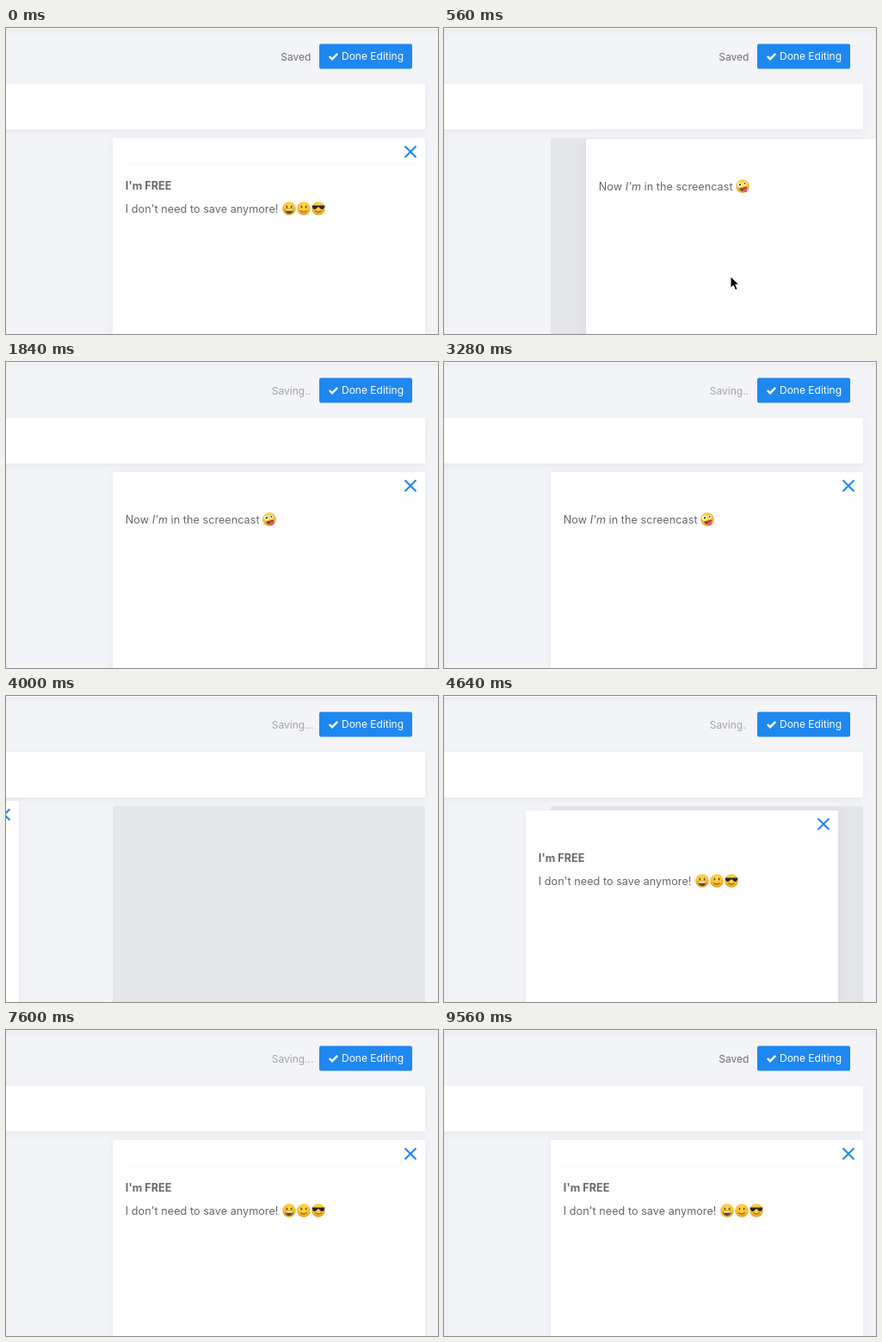
Write an HTML page that moves like this. It is 502 px wide and 356 px high and loops after 9680 ms.

```html
<!DOCTYPE html>
<html lang="en">
<head>
<meta charset="utf-8">
<title>Card swap</title>
<style>
  html, body { margin: 0; width: 100%; height: 100%; overflow: hidden; background: #f3f4f8; }
  svg { display: block; }
  text { font: 12.6px Inter, "Open Sans", sans-serif; letter-spacing: .05px; fill: #666; white-space: pre; }
  .bold { font-weight: 700; }
  .small { font-size: 12px; letter-spacing: 0; }
  .box { fill: #fff; filter: drop-shadow(0 2px 4px rgba(0, 0, 0, .06)); }
</style>
</head>
<body>
<svg width="502" height="356" viewBox="0 0 502 356">
  <defs>
    <radialGradient id="skin" cy=".35" r=".7">
      <stop offset="0" stop-color="#ffe04e"/>
      <stop offset=".6" stop-color="#f9bf33"/>
      <stop offset="1" stop-color="#d98a1c"/>
    </radialGradient>
    <circle id="head" r="7.8" fill="url(#skin)"/>
    <path id="smile" d="M-3.6 2.7Q0 5.7 3.6 2.7" fill="none" stroke="#7a4a12" stroke-linecap="round"/>
    <g id="eyes" fill="#6b4010">
      <ellipse cx="-2.6" cy="-2" rx=".9" ry="1.5"/>
      <ellipse cx="2.6" cy="-2" rx=".9" ry="1.5"/>
    </g>
    <g id="frame">
      <rect class="box" x="124" y="128" width="363" height="250" rx="2"/>
      <path d="M133 158.5H479" stroke="#fafafb"/>
      <path d="M463.5 137.5l13 13m0-13l-13 13" stroke="#1e87f0" stroke-width="2"/>
    </g>
  </defs>

  <rect class="box" x="-10" y="-9" width="522" height="10"/>
  <rect class="box" x="-10" y="65" width="497" height="53" rx="2"/>
  <rect x="364" y="18.5" width="108" height="29" rx="2" fill="#1e87f0"/>
  <path d="M375.8 33l3.2 3.2 6.2-6.4" fill="none" stroke="#fff" stroke-width="2.4"/>
  <text class="small" x="390" y="37.3" style="fill:#fff">Done Editing</text>
  <text class="small" id="status" y="38"></text>

  <rect x="124" y="128" width="363" height="250" rx="2" fill="#e4e5e9"/>

  <g id="free">
    <use href="#frame"/>
    <text class="bold" x="138.8" y="188">I'm FREE</text>
    <text x="138.8" y="215">I don't need to save anymore!</text>
    <g transform="translate(329 210)">
      <use href="#head"/><use href="#eyes"/>
      <path d="M-5 .8H5Q4.4 6.2 0 6.2T-5 .8" fill="#7a4a12"/>
      <path d="M-4.5 1.1H4.5L4.1 2.5H-4.1Z" fill="#fff"/>
    </g>
    <g transform="translate(346 210)">
      <use href="#head"/><use href="#eyes"/><use href="#smile"/>
    </g>
    <g transform="translate(363 210)">
      <use href="#head"/><use href="#smile"/>
      <path d="M-7.6-3.6H7.6L6.4 0Q3.5 2.4 1-1.6H-1Q-3.5 2.4-6.4 0Z" fill="#26262b"/>
    </g>
  </g>

  <g id="now">
    <use href="#frame"/>
    <text x="138.8" y="188">Now <tspan font-style="italic">I'm</tspan> in the screencast</text>
    <g transform="translate(306 183) rotate(-14)">
      <use href="#head"/>
      <circle cx="-3" cy="-2.3" r="2.7" fill="#fff"/>
      <circle cx="3.2" cy="-2" r="2.1" fill="#fff"/>
      <circle cx="-2.5" cy="-2.5" r="1.2" fill="#5b3510"/>
      <circle cx="3.2" cy="-2.4" r="1" fill="#5b3510"/>
      <path d="M-4.5 1.8H4.8Q4 5.8 0 5.8T-4.5 1.8" fill="#7a4a12"/>
      <path d="M-.5 3.3H3.8V6.2Q1.6 9.5-.5 6.2Z" fill="#ec4f86"/>
    </g>
  </g>

  <path id="cursor" d="M0 0V13.6L3.2 10.6 5.5 15.8 8 14.7 5.8 9.7H10Z" fill="#000" stroke="#fff"/>
</svg>
<script>
const LOOP = 9680, STEP = 40, DOT_TIME = 640;
const status = document.getElementById("status");

// Eased progress from 0 to 1
function glide(t, start, duration) {
  const p = Math.min(1, Math.max(0, (t - start) / duration));
  return 1 - (1 - p) ** 1.5;
}

function place(id, x, y) {
  document.getElementById(id).setAttribute("transform", `translate(${Math.round(x)} ${Math.round(y)})`);
}

function moveCards(t) {
  // Out to the left, back in, held short of the slot, dropped
  const freeOut = glide(t, 0, 240), freeIn = glide(t, 4320, 320), freeDrop = glide(t, 4880, 200);
  place("free", -490 * freeOut + 461 * freeIn + 29 * freeDrop, -9 * freeOut + 14 * freeIn - 5 * freeDrop);

  // In from the right, dropped, out to the left
  const nowIn = glide(t, 360, 275), nowDrop = glide(t, 880, 120), nowOut = glide(t, 3680, 360);
  const x = 380 - 395 * nowIn + 15 * nowDrop - 490 * nowOut;
  const y = 7 - 7 * nowIn - 6 * nowOut;
  place("now", x, y);

  // Holds the card, then leaves downwards
  place("cursor", x + 292, y + 288 + 90 * nowDrop);
}

function showStatus(t) {
  const start = t < 4960 ? 920 : 6600;
  const saving = t >= start && t < 8760;
  const dots = 1 + Math.floor((t - start + 280) / DOT_TIME) % 3;
  status.textContent = saving ? "Saving" + ".".repeat(dots) : "Saved";
  status.setAttribute("x", saving ? 308.8 : 319.3);
  status.style.fill = saving ? "#a3a4a6" : "#707070";
}

function draw() {
  const t = Math.floor(performance.now() % LOOP / STEP) * STEP;
  moveCards(t);
  showStatus(t);
  requestAnimationFrame(draw);
}
draw();
</script>
</body>
</html>
```
